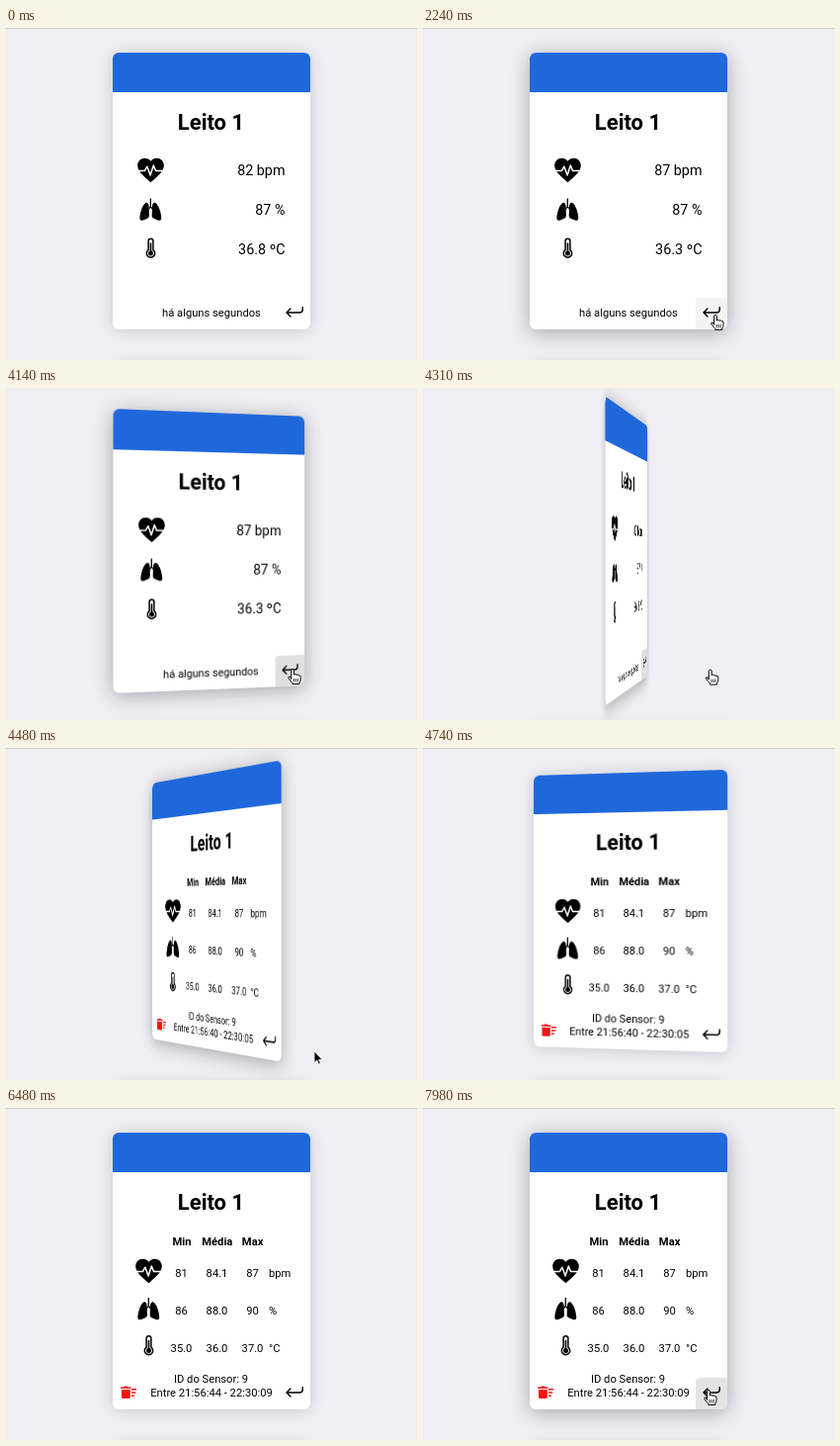
These frames come from a looping animation (416x336 px, 8000 ms). An HTML page:

```html
<!DOCTYPE html>
<html lang="pt">
<head>
<meta charset="utf-8">
<title>Leito 1</title>
<style>
  html, body { margin: 0; width: 100%; height: 100%; overflow: hidden; }
  body { background: #eeeef4; font-family: Roboto, Arial, sans-serif; }
  #stage { position: relative; width: 416px; height: 336px; overflow: hidden; }
  #topLine { position: absolute; inset: 0 0 auto; height: 1px; background: #d0d0d5; }
  #nextCard { position: absolute; left: 108px; top: 343px; width: 200px; height: 280px;
    border-radius: 6px; box-shadow: 0 1px 15px rgba(0, 0, 0, .27); }
  #scene { position: absolute; left: 108px; top: 25px; width: 200px; height: 280px; perspective: 920px; }
  #card, .face { position: absolute; inset: 0; }
  #card { transform-style: preserve-3d; }
  .face { border-radius: 6px; background: #fff; backface-visibility: hidden; }
  #back { transform: rotateY(180deg); }
  .face svg { display: block; width: 200px; height: 280px; border-radius: 6px; }
  #pointer { position: absolute; inset: 0; }
  text { font-size: 11.2px; }
  .title { font-size: 22px; font-weight: 700; }
  .reading { font-size: 14.35px; text-anchor: end; }
  .mid { text-anchor: middle; }
  .bold { font-weight: 700; }
</style>
</head>
<body>
<div id="stage">
  <div id="topLine"></div>
  <div id="nextCard"></div>
  <div id="scene"><div id="card">
    <div class="face" id="front"></div>
    <div class="face" id="back"></div>
  </div></div>
  <svg id="pointer" width="416" height="336" viewBox="0 0 416 336">
    <g id="cursor" stroke-linejoin="round">
      <path id="arrow" fill="#000" stroke="#fff" stroke-width=".8"
        d="M0 0V11.6L2.7 9.1L4.4 13L6.3 12.2L4.6 8.4H8.2Z"/>
      <g id="hand" stroke="#000" stroke-width="1" stroke-linecap="round">
        <path fill="#fff" d="M-1.4 9V.8Q-1.4-.6 0-.6T1.4 .8V5Q3 4 4 5.2Q5.4 4.5 6.2 5.7Q8 5.2 8 7.2V9.6Q8 11.6 6.8 13V14.4H-.2V13.2Q-2.6 11-4.2 8.4Q-4.6 6.6-3 7Z"/>
        <path fill="none" stroke-width=".8" d="M1.2 9.3v2.6M3.2 9.3v2.6M5.2 9.3v2.6"/>
      </g>
    </g>
  </svg>
</div>
<script>
const LOOP = 8000;
const FLIP_START = 4050, FLIP_TIME = 1000;
const READING_AT = 910, CLOCK_AT = 4910;
const $ = id => document.getElementById(id);

const text = (x, y, content, cls = "", id = "") =>
  `<text x="${x}" y="${y}" class="${cls}" id="${id}">${content}</text>`;
const at = (x, y, shape) => `<g transform="translate(${x} ${y})">${shape}</g>`;

// Icons are drawn around their own centre.
const heart = `
  <path d="M0 12.2C-8 5.4-13.3 1-13.3-4.9C-13.3-9-10.2-12.2-6-12.2C-3.6-12.2-1.4-11 0-9.2C1.4-11 3.6-12.2 6-12.2C10.2-12.2 13.3-9 13.3-4.9C13.3 1 8 5.4 0 12.2Z"/>
  <path d="M-13.5 .4H-6L-3.6-3.8L-.4 5L2.8-5L5 .4H13.5" fill="none" stroke="#fff" stroke-width="1.5" stroke-linejoin="round"/>`;
const lobe = `<path d="M-1.7-3.6C-1.9-6.4-3.4-7.8-5-7C-8.2-4.8-10.4 1.8-10.9 7.5C-11.1 10.8-9.8 11.3-7.4 10.4L-3.2 8.8Q-1.4 8-1.4 6Z"/>`;
const lungs = `${lobe}<g transform="scale(-1 1)">${lobe}</g>
  <path d="M0-11.5V-2.5M0-3.2L-3 .4M0-3.2L3 .4" fill="none" stroke="#000" stroke-width="1.3"/>`;
const thermometer = `
  <path d="M-2.4 1.6V-7.4A2.4 2.4 0 0 1 2.4-7.4V1.6A4.2 4.2 0 1 1-2.4 1.6Z" fill="#fff" stroke="#000" stroke-width="1.5"/>
  <circle cy="5" r="2.5"/><path d="M0 5V-5.5" stroke="#000" stroke-width="1.6"/>`;
const trash = `
  <g fill="#f11"><path d="M116 282.4h3l1-1h2.6l1 1h3v1.7H116Z"/>
  <path d="M117 285h8.8v7.4q0 1.5-1.5 1.5h-5.8q-1.5 0-1.5-1.5Z"/>
  <path d="M127 284h5.2v1.5H127ZM127 287.2h4.4v1.5H127ZM127 290.4h2.8v1.5H127Z"/></g>`;
const flipButton = `
  <path class="glow" d="M276 305V277Q276 273 280 273H308V305Z" opacity="0"/>
  <path d="M300.2 282.6V285Q300.2 288 297.2 288H284.2M288 284L284 288L288 292" fill="none" stroke="#000" stroke-width="1.4" stroke-linecap="round" stroke-linejoin="round"/>`;

const face = body => `<svg viewBox="108 25 200 280">
  <rect x="108" y="25" width="200" height="40" fill="#1f68dc"/>
  ${text(207.5, 103, "Leito 1", "title mid")}${body}${flipButton}</svg>`;

const statRow = (y, min, mean, max, unit) =>
  [min, mean, max].map((v, i) => text(177.5 + 36 * i, y, v, "mid")).join("") + text(266, y, unit);

$("front").innerHTML = face(
  at(146.5, 144, heart) + at(146.3, 184, lungs) + at(146.5, 223, thermometer) +
  text(282.5, 149, "", "reading", "pulse") +
  text(282.5, 189, "87 %", "reading") +
  text(282.5, 229, "", "reading", "heat") +
  text(208, 292, "há alguns segundos", "mid"));

$("back").innerHTML = face(
  at(144.5, 165, heart) + at(144.3, 203.5, lungs) + at(144.5, 240.5, thermometer) +
  ["Min", "Média", "Max"].map((h, i) => text(178 + 35.8 * i, 139, h, "mid bold")).join("") +
  statRow(171, "81", "84.1", "87", "bpm") +
  statRow(209, "86", "88.0", "90", "%") +
  statRow(247, "35.0", "36.0", "37.0", "°C") +
  text(207.5, 278, "ID do Sensor: 9", "mid") +
  text(208, 292, "", "mid", "span") + trash);

const glows = document.querySelectorAll(".glow");
const faces = document.querySelectorAll(".face");

// Each key is [time, ...values]; values ease between neighbouring keys.
const cursorKeys = [
  [1980, 322, 340], [2240, 296, 291], [2740, 294, 289], [2860, 297, 290],
  [3150, 350, 300], [3320, 350, 300], [3640, 291, 286], [4290, 290, 285],
  [4480, 312, 307], [4700, 328, 342], [7100, 328, 342], [7420, 302, 297],
  [7740, 289, 286]];
const glowKeys = [
  [2150, 0], [2260, .05], [2860, .05], [3000, 0], [3520, 0], [3650, .05],
  [4000, .05], [4100, .12], [4300, .12], [4440, 0], [7520, 0], [7680, .06],
  [7880, .06], [7970, .11]];
const liftKeys = [
  [2060, 0], [2230, 1], [2900, 1], [3100, 0], [3380, 0], [3580, 1],
  [4480, 1], [4740, 0], [7250, 0], [7450, 1]];

function track(keys, t) {
  const next = keys.findIndex(k => k[0] > t);
  if (next === 0) return keys[0].slice(1);
  if (next < 0) return keys[keys.length - 1].slice(1);
  const a = keys[next - 1], b = keys[next];
  const p = (t - a[0]) / (b[0] - a[0]), s = p * p * (3 - 2 * p);
  return a.slice(1).map((v, i) => v + (b[i + 1] - v) * s);
}

// CSS "ease": cubic-bezier(.25, .1, .25, 1)
function ease(x) {
  if (x <= 0 || x >= 1) return x <= 0 ? 0 : 1;
  const curve = (p, q, u) => 3 * p * u * (1 - u) ** 2 + 3 * q * u * u * (1 - u) + u ** 3;
  let lo = 0, hi = 1;
  for (let i = 0; i < 20; i++) {
    const u = (lo + hi) / 2;
    if (curve(.25, .25, u) < x) lo = u; else hi = u;
  }
  return curve(.1, 1, lo);
}

function render(t) {
  const turn = ease((t - FLIP_START) / FLIP_TIME);
  $("card").style.transform = `rotateY(${180 * turn}deg)`;

  const [lift] = track(liftKeys, t);
  const shadow = `0 ${1 + 2 * lift}px ${15 + 5 * lift}px rgba(0,0,0,${.17 + .14 * lift})`;
  faces.forEach(f => f.style.boxShadow = shadow);

  const [glow] = track(glowKeys, t);
  glows.forEach(g => g.setAttribute("opacity", glow));

  const updated = t >= READING_AT;
  $("pulse").textContent = updated ? "87 bpm" : "82 bpm";
  $("heat").textContent = updated ? "36.3 ºC" : "36.8 ºC";
  $("span").textContent = t >= CLOCK_AT ? "Entre 21:56:44 - 22:30:09" : "Entre 21:56:40 - 22:30:05";

  const [x, y] = track(cursorKeys, t);
  const onButton = x > 276 && x < 308 && y > 273 && y < 305;
  $("cursor").setAttribute("transform", `translate(${x} ${y})`);
  $("hand").style.display = onButton ? "" : "none";
  $("arrow").style.display = onButton ? "none" : "";

  const settling = t > 4060 && t < 4400;
  $("topLine").style.opacity = settling ? 0 : 1;
  $("nextCard").style.opacity = settling ? .5 : 1;
}

const start = performance.now();
function tick() {
  render((performance.now() - start) % LOOP);
  requestAnimationFrame(tick);
}
tick();
</script>
</body>
</html>
```
